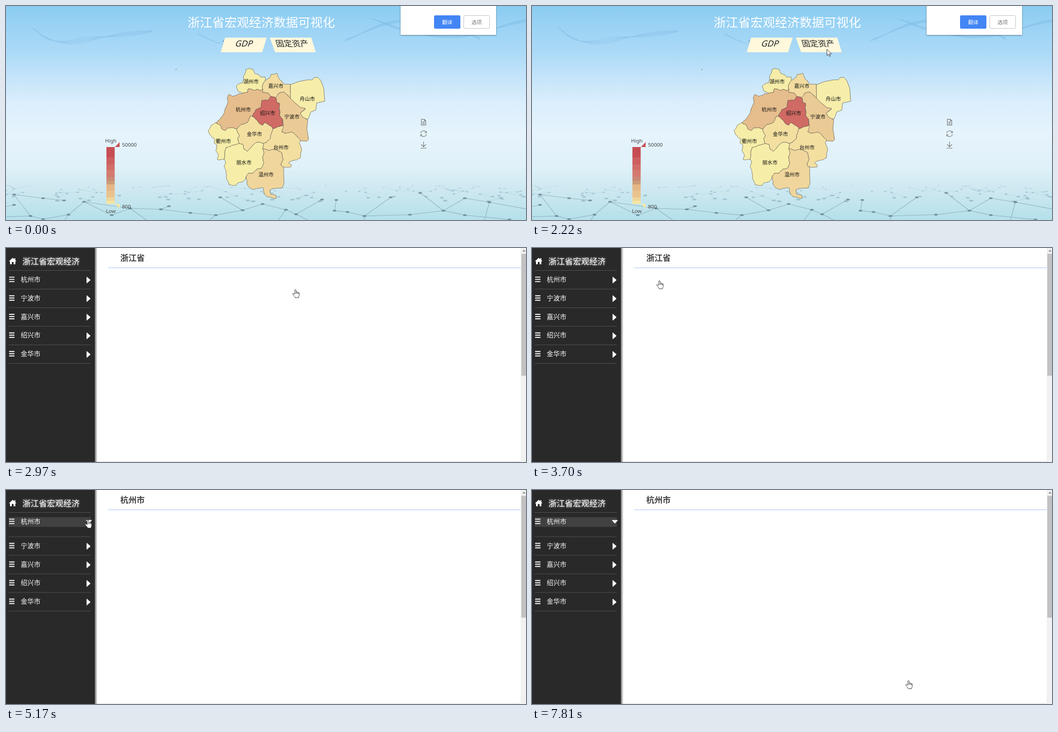
Recreate the animation shown at these times as an HTML page. Size 1165 by 481 pixels, loop 8 s.

```html
<!DOCTYPE html>
<html lang="zh-CN">
<head>
<meta charset="utf-8">
<title>宏观经济数据可视化</title>
<style>
html, body { margin: 0; width: 100%; height: 100%; overflow: hidden; background: #fff; }
svg { display: block; width: 1165px; height: 481px; }
text { font-family: "Noto Sans", "Noto Sans CJK SC", "Noto Sans CJK", sans-serif; }
.mid { text-anchor: middle; }
#map polygon { stroke: #5c5850; stroke-width: .8; stroke-linejoin: round; }
#map text { font-size: 11.3px; fill: #111; text-anchor: middle; }
#legend text { font-size: 11.5px; fill: #444; }
#tools { fill: none; stroke: #666; stroke-width: 1.1; }
#waves { fill: none; stroke: #4f86b8; stroke-width: .9; opacity: .26; }
#waves path { stroke-opacity: .6; }
#far { fill: #5c7f90; stroke: #5c7f90; stroke-width: .6; opacity: .34; }
#near { fill: none; stroke: #5a7a88; stroke-width: 1.1; opacity: .5; }
#menu text { font-size: 14.7px; font-weight: 500; fill: #fff; }
.brand { filter: drop-shadow(0 0 2px rgba(255, 255, 255, .65)); }
.head { font-size: 18.3px; font-weight: 700; fill: #444; }

.anim { animation: 8s linear infinite; }
#popup { animation-name: fade; }
#page { animation-name: page; }
#glow { animation-name: glow; }
#shift { animation-name: shift; }
.before { animation-name: before; }
.after { animation-name: after; }
#cursor { animation-name: move; }
#arrow { animation-name: arrow; }
#hand { animation-name: hand; }

@keyframes fade {
  0%, 33.75% { opacity: 1; animation-timing-function: steps(3, start); }
  36.75%, 100% { opacity: 0; }
}
@keyframes page { 0%, 37.12% { opacity: 0; } 37.125%, 100% { opacity: 1; } }
@keyframes glow { 0%, 52.94% { opacity: 0; } 52.95%, 100% { opacity: 1; } }
@keyframes before { 0%, 57.74% { opacity: 1; } 57.75%, 100% { opacity: 0; } }
@keyframes after { 0%, 57.74% { opacity: 0; } 57.75%, 100% { opacity: 1; } }
@keyframes arrow { 0%, 28.7% { opacity: 1; } 28.71%, 100% { opacity: 0; } }
@keyframes hand { 0%, 28.7% { opacity: 0; } 28.71%, 100% { opacity: 1; } }
@keyframes shift {
  0%, 57.75% { transform: translateY(0); animation-timing-function: steps(8, start); }
  65.6125%, 100% { transform: translateY(12.6px); }
}
@keyframes move {
  0%, 3.625% { transform: translate(1045px, 506px); animation-timing-function: steps(3, start); }
  6.8125% { transform: translate(763px, 347px); }
  8.625% { transform: translate(763px, 347px); animation-timing-function: steps(11, start); }
  19.075% { transform: translate(668px, 102px); }
  19.125% { transform: translate(668px, 102px); animation-timing-function: steps(4, start); }
  22.9625% { transform: translate(664px, 98px); }
  27.75% { transform: translate(664px, 98px); animation-timing-function: steps(4, start); }
  31.5875% { transform: translate(649px, 93px); }
  43.25% { transform: translate(649px, 93px); animation-timing-function: steps(4, start); }
  47.25% { transform: translate(286px, 73px); }
  49.25% { transform: translate(286px, 73px); animation-timing-function: steps(6, start); }
  54.8% { transform: translate(184px, 67px); }
  90.75% { transform: translate(184px, 67px); animation-timing-function: steps(2, start); }
  93% { transform: translate(678px, 280px); }
  95.75% { transform: translate(678px, 280px); animation-timing-function: steps(3, start); }
  98.5625%, 100% { transform: translate(844px, 428px); }
}
</style>
</head>
<body>
<svg viewBox="0 0 1165 481" xmlns="http://www.w3.org/2000/svg">
  <defs>
    <linearGradient id="sky" x2="0" y2="1">
      <stop offset="0" stop-color="#8accf0"/>
      <stop offset=".1" stop-color="#9bd3f5"/>
      <stop offset=".22" stop-color="#acdaf7"/>
      <stop offset=".32" stop-color="#c2e3fa"/>
      <stop offset=".45" stop-color="#daeefc"/>
      <stop offset=".6" stop-color="#e6f4fc"/>
      <stop offset=".75" stop-color="#e0f1f9"/>
      <stop offset=".85" stop-color="#cfe9f1"/>
      <stop offset="1" stop-color="#b5e0ea"/>
    </linearGradient>
    <linearGradient id="edge">
      <stop offset="0" stop-color="#000" stop-opacity=".55"/>
      <stop offset="1" stop-color="#000" stop-opacity="0"/>
    </linearGradient>
    <marker id="node" markerUnits="userSpaceOnUse" markerWidth="12" markerHeight="8" refX="6" refY="4">
      <ellipse cx="6" cy="4" rx="4.2" ry="2" fill="#2f4a56"/>
    </marker>
    <filter id="soft" x="-10%" y="-20%" width="120%" height="150%">
      <feDropShadow dx="0" dy="1" stdDeviation="1.5" flood-opacity=".45"/>
    </filter>
    <path id="bars" d="M7-5H19M7 0H19M7 5H19" stroke="#fff" stroke-width="2.2"/>
    <path id="line" d="M6 0H190" stroke="#575757"/>
    <path id="tri" d="M181-6L189 1L181 8Z" fill="#fff" stroke="#fff" stroke-linejoin="round"/>
  </defs>

  <rect width="1165" height="481" fill="url(#sky)"/>
  <g id="waves"></g>
  <g id="far"></g>
  <path id="near" marker-start="url(#node)" marker-mid="url(#node)" marker-end="url(#node)" d="M18 424L55 472L83 479L140 469L175 440L278 455L347 457L365 450M278 455L237 470L175 440M-6 474L55 472M-6 452L18 447M18 424L83 432L130 437M140 469L127 488M278 455L325 488M347 457L413 465L470 470L530 459L575 445L627 458L650 468L708 435M480 430L530 459M470 470L447 488M627 458L605 488M650 468L690 488M740 436L736 460L765 463L803 472L862 430M803 472L803 488M803 472L905 469L980 460L1028 432L1083 441L1170 457M1128 480L1028 470L980 460M1083 441L1070 488M928 420L980 460"/>
  <path d="M485 80L488 78M380 142.5H382" stroke="#345"/>

  <text class="mid" x="572" y="46.500" font-size="27.5" fill="#fff">浙江省宏观经济数据可视化</text>
  <path d="M491 71H584L574 104H481ZM591 71H684L694 104H603Z" fill="#fff8dc"/>
  <g class="mid" fill="#222">
    <text font-size="18.8" transform="translate(532 91) skewX(-17)">GDP</text>
    <text font-size="18.3" transform="translate(643 91) skewX(17)">固定资产</text>
  </g>

  <g id="map">
    <polygon class="smooth" fill="#f6edaa" points="637,177 655,170 675,166 686,166 690,161 698,160 705,167 712,185 714,214 696,218 694,234 683,238 677,254 670,253 664,249 659,241 671,232 660,228 648,218 637,207"/>
    <polygon class="smooth" fill="#eacb95" points="604,206 609,198 615,194 622,193 629,199 637,207 648,218 660,228 671,230 659,241 664,249 676,256 674,276 678,300 674,304 660,303 650,291 640,283 634,285 626,286 618,283 621,268 620,255 613,246 614,238 612,228 613,219 606,216 606,209"/>
    <polygon fill="#f2dca0" points="574,180 577,173 581,167 590,162 594,154 601,153 607,151 612,164 617,168 622,175 637,176 637,207 629,199 622,193 615,194 609,198 604,206 593,203 588,196 575,194 575,187"/>
    <polygon fill="#f5eda8" points="537,143 545,140 553,142 558,152 567,155 571,160 580,159 581,167 577,173 574,180 575,187 571,190 562,187 556,190 550,187 543,186 541,194 529,196 519,191 516,180 524,174 531,172 532,160"/>
    <polygon fill="#e6bd8c" points="499,199 508,203 519,199 529,196 541,194 543,186 550,187 556,190 562,187 571,190 575,187 575,194 588,196 593,203 588,211 573,212 572,227 562,232 554,243 552,248 547,248 541,262 527,266 521,272 517,276 510,274 497,274 491,280 483,276 480,268 470,262 483,250 490,235 493,227 497,218 496,206"/>
    <polygon fill="#f5eda8" points="470,262 480,268 483,276 491,280 497,274 510,274 517,276 518,283 523,292 519,298 522,309 515,311 501,316 493,318 490,328 489,345 483,345 474,346 476,336 470,325 473,313 466,308 468,300 456,289 453,280 460,268"/>
    <polygon fill="#f3dfa0" points="547,248 552,248 562,256 566,262 575,268 580,262 588,267 594,270 598,276 595,286 592,298 583,307 577,309 565,306 556,310 545,322 540,327 533,322 531,311 522,309 519,298 523,292 518,283 517,276 521,272 527,266 541,262"/>
    <polygon fill="#f3dfa0" points="598,276 610,271 621,268 618,283 626,286 634,285 640,283 650,291 660,303 657,308 662,320 659,342 648,346 640,348 633,353 639,357 638,362 630,363 622,362 616,357 621,345 618,330 608,324 598,322 590,325 582,322 575,320 577,309 583,307 592,298 595,286"/>
    <polygon fill="#f6eea8" points="493,318 501,316 515,311 522,309 531,311 533,322 540,327 545,322 556,310 565,306 577,309 575,320 578,330 575,340 578,352 573,364 563,366 553,376 543,376 538,384 535,391 530,395 519,398 515,404 500,402 494,389 493,374 489,362 492,352 489,345 490,328"/>
    <polygon fill="#f0d69c" points="575,320 582,322 590,325 598,322 608,324 618,330 621,345 616,357 622,362 622,380 623,398 620,405 618,409 600,410 591,414 594,424 604,425 606,432 600,433 586,429 580,424 577,410 572,408 565,410 553,412 545,408 540,400 538,384 543,376 553,376 563,366 573,364 578,352 575,340 578,330"/>
    <polygon fill="#d06a64" points="593,203 601,204 606,209 606,216 613,219 612,228 614,238 613,246 620,255 621,268 610,271 598,276 594,270 588,267 580,262 575,268 566,262 562,256 552,248 554,243 562,232 572,227 573,212 588,211"/>
    <text x="549" y="173.5">湖州市</text>
    <text x="604.5" y="183.5">嘉兴市</text>
    <text x="675" y="212.5">舟山市</text>
    <text x="531.5" y="236.5">杭州市</text>
    <text x="586" y="245">绍兴市</text>
    <text x="640.5" y="252.5">宁波市</text>
    <text x="556.5" y="291.5">金华市</text>
    <text x="487" y="307.5">衢州市</text>
    <text x="616" y="321.5">台州市</text>
    <text x="533" y="356">丽水市</text>
    <text x="582.5" y="382.5">温州市</text>
  </g>

  <g id="legend">
    <path d="M244 317L254.500 306V317Z" fill="#c85054"/>
    <path d="M244 445H254.500V455Z" fill="#f5e9a4"/>
    <text x="222" y="307">High</text>
    <text x="260" y="316">50000</text>
    <text x="260" y="455">800</text>
    <text x="224" y="465">Low</text>
  </g>

  <g id="tools">
    <path d="M930.500 254.500H937L940.500 258V268H930.500ZM937 254.500V258H940.500M932.500 260.500H938.500M932.500 263H938.500M932.500 265.500H938.500"/>
    <path d="M929 286A6.600 6.600 0 0 1 941 283.500M942 281V285H938M942 288A6.600 6.600 0 0 1 930 290.500M929 293V289H933"/>
    <path d="M935.500 305V316M930 311L935.500 316.500L941 311M929 319.500H942"/>
  </g>

  <g id="popup" class="anim">
    <rect x="884" y="-8" width="214" height="73" rx="1.500" fill="#fff" filter="url(#soft)"/>
    <rect x="959" y="21" width="59" height="30" rx="3" fill="#4285f4"/>
    <rect x="1025.500" y="21.500" width="58" height="29" rx="3" fill="#fff" stroke="#b5bdbf"/>
    <g class="mid" font-size="11.500">
      <text x="988.500" y="41" fill="#fff">翻译</text>
      <text x="1054.500" y="41" fill="#777">选项</text>
    </g>
  </g>

  <g id="page" class="anim">
    <rect width="1165" height="481" fill="#fff"/>
    <path d="M199 480.500H1153" stroke="#d0d0d0"/>
    <rect x="199" width="6" height="481" fill="url(#edge)"/>
    <rect width="199" height="481" fill="#292929"/>
    <text class="head anim before" x="256" y="28.500">浙江省</text>
    <text class="head anim after" x="256" y="28.500">杭州市</text>
    <path d="M229 44.500H1153" stroke="#9dbdf3"/>
    <rect x="1153" width="12" height="481" fill="#f1f1f1"/>
    <rect x="1154.500" y="13" width="10.500" height="274" fill="#c1c1c1"/>
    <path d="M1157 8L1160.500 4L1164 8Z" fill="#888"/>

    <path d="M6.500 30L15 22L18.500 25.200V23H21V27.500L23.500 30H21V36.500H17V31.500H13V36.500H9V30Z" fill="#fff"/>
    <text class="brand" x="37" y="36.500" font-size="18.300" font-weight="500" fill="#fff">浙江省宏观经济</text>
    <use href="#line" y="50.500"/>
    <g id="menu">
      <rect id="glow" class="anim" x="6" y="61" width="184" height="22" fill="#414141"/>
      <use href="#bars" y="70.500"/>
      <text x="33" y="76">杭州市</text>
      <use class="anim before" href="#tri" y="71"/>
      <path class="anim after" d="M179.500 68H192L185.700 75Z" fill="#fff" stroke="#fff" stroke-linejoin="round"/>
      <g id="shift" class="anim"><use href="#line" y="92.300"/></g>
    </g>
  </g>

  <g id="cursor" class="anim" fill="#fff" stroke="#111" stroke-width=".9" stroke-linejoin="round">
    <path id="arrow" class="anim" d="M.5.5V14.500L3.800 11.500L6 16.500L8 15.600L5.900 10.700H10.500Z"/>
    <path id="hand" class="anim" d="M-2 11V1.800C-2 0 1 0 1 1.800V6.500C1.500 5.200 3.600 5.400 3.700 6.800C4.500 6 6 6.300 6.100 7.600C7.200 7 8 7.700 8 9V12C8 14.500 6.800 15 6.500 18.700H-1C-1.500 16-4 14.500-6.500 11C-7.200 9.500-5.400 8.400-4 9.500ZM1 6.500V10M3.700 7V10M6.100 7.600V10.500"/>
  </g>
</svg>
<script>
const $ = id => document.getElementById(id);

function add(parent, tag, attrs, text = "") {
  const el = document.createElementNS("http://www.w3.org/2000/svg", tag);
  for (const key in attrs) el.setAttribute(key, attrs[key]);
  el.textContent = text;
  parent.append(el);
  return el;
}

// Gauzy strands in the sky
const strand = d => add($("waves"), "path", { d });
for (let k = 0; k < 7; k++) {
  strand(`M${57 + k * 2} ${48 + k}C85 ${70 + k * 2} 120 ${90 - k} 160 ${85 - k * 2}S240 ${55 + k * 4} 328 ${55 + k * .5}`);
  strand(`M${757 + k} ${80 - k}C${805 + k * 2} ${62 - k} 835 ${28 + k * 2} 910 ${30 + k * .5}S1010 ${50 + k * 2} 1062 ${76 - k}`);
  strand(`M${815 + k * 3} ${27 + k}C870 ${42 + k * 2} 930 ${74 - k} 1000 ${72 - k}S1100 ${40 + k} 1165 ${30 + k}`);
  if (k < 4) strand(`M430 ${61 + k}C450 ${70 + k} 470 84 490 86`);
}

// Distant nodes, larger the nearer they lie
let seed = 11;
const rand = () => (seed = seed * 16807 % 2147483647) / 2147483647;
const nodes = Array.from({ length: 130 }, () => [rand() * 1165, 403 + 36 * rand() ** 1.4]);
nodes.forEach(([x, y], i) => {
  const size = .9 + (y - 403) / 18;
  add($("far"), "ellipse", { cx: x, cy: y, rx: size * 1.7, ry: size * .7, stroke: "none" });
  nodes.slice(i + 1).filter(([u, v]) => Math.abs(u - x) < 40 && Math.abs(v - y) < 12).slice(0, 1)
    .forEach(([u, v]) => add($("far"), "path", { d: `M${x} ${y}L${u} ${v}`, "stroke-opacity": .6 }));
});

// Ragged borders: the offset depends only on the place, so neighbours agree
const noise = n => { const v = Math.sin(n) * 43758.5; return v - Math.floor(v) - .5; };
function ragged(a, b) {
  const len = Math.hypot(a[0] - b[0], a[1] - b[1]);
  if (len < 3) return [a];
  const x = (a[0] + b[0]) / 2, y = (a[1] + b[1]) / 2, amp = Math.min(len * .28, 1.8);
  const m = [x + amp * noise(x * 12.9 + y * 78.2), y + amp * noise(x * 39.3 + y * 11.1)];
  return [...ragged(a, m), ...ragged(m, b)];
}
document.querySelectorAll("#map polygon:not(.smooth)").forEach(shape => {
  const pts = shape.getAttribute("points").split(" ").map(p => p.split(",").map(Number));
  shape.setAttribute("points", pts.flatMap((p, i) => ragged(p, pts[(i + 1) % pts.length])).join(" "));
});

// Legend bands: top edge and colour
const bands = [[317, "#c64d53"], [340, "#cd5f61"], [356, "#d26d69"], [369, "#d47a70"], [384, "#c98a73"],
  [393, "#cc9c79"], [401, "#e5b787"], [415, "#e9c38f"], [430, "#efd69b"], [438, "#f4e5a3"], [445]];
bands.slice(0, -1).forEach(([y, fill], i) =>
  add($("legend"), "rect", { x: 225, y, width: 18.5, height: bands[i + 1][0] - y, fill }));

["宁波市", "嘉兴市", "绍兴市", "金华市"].forEach((city, i) => {
  const y = 112.3 + 41.8 * i;
  add($("shift"), "use", { href: "#bars", y });
  add($("shift"), "text", { x: 33, y: y + 5.5 }, city);
  add($("shift"), "use", { href: "#tri", y: y + .5 });
  add($("shift"), "use", { href: "#line", y: y + 21.8 });
});
</script>
</body>
</html>
```
